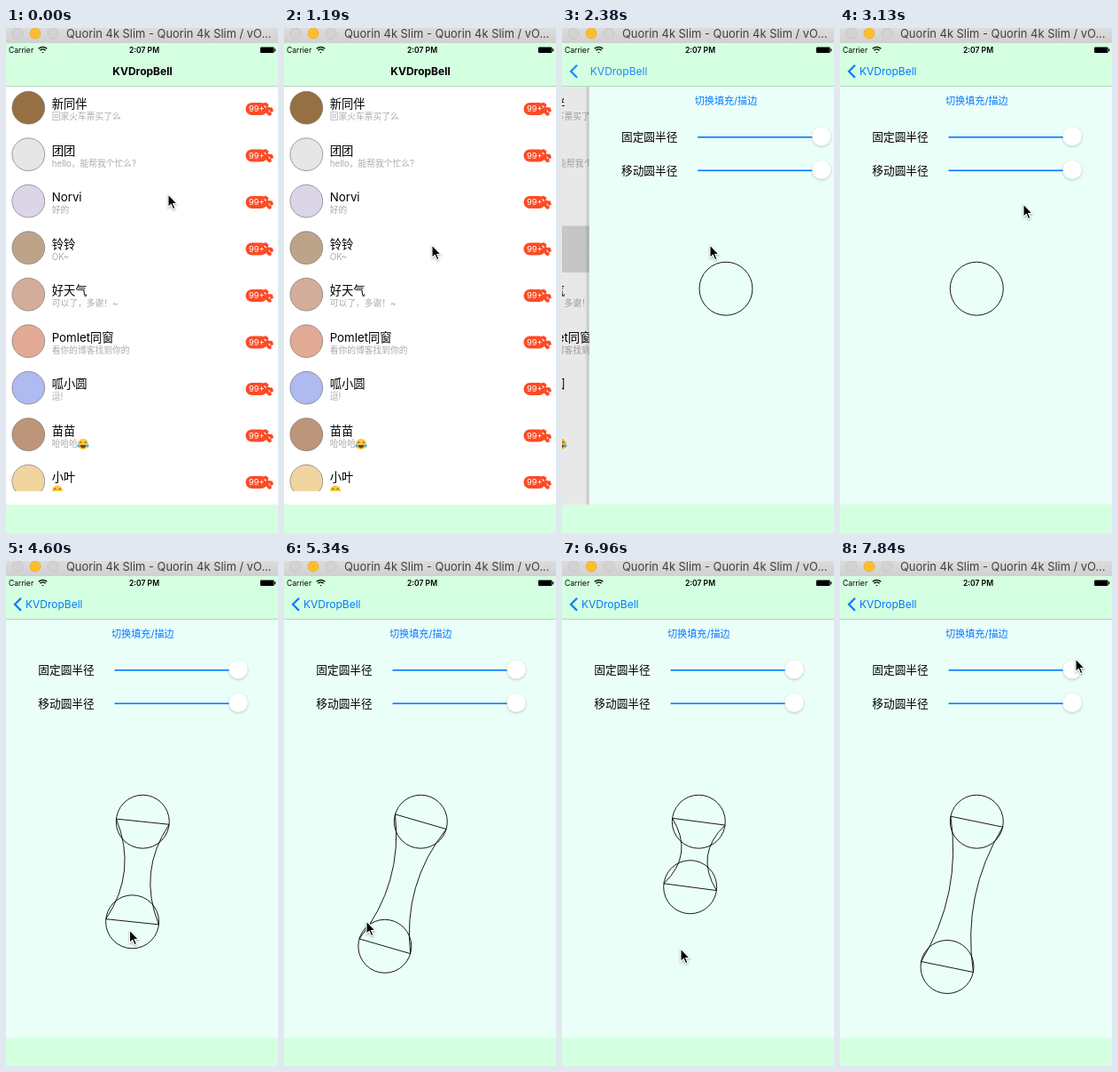
Animation, 307 px wide and 568 px high, one loop 7990 ms. Source, as an HTML page:

```html
<!DOCTYPE html>
<html lang="zh-CN">
<head>
<meta charset="utf-8">
<title>Liquid drag</title>
<style>
html, body { margin: 0; width: 100%; height: 100%; overflow: hidden; background: #d4ffe0; }
svg { display: block; width: 307px; height: 568px; }
text { font-family: Inter, "Noto Sans CJK SC", "Noto Sans CJK", sans-serif; white-space: pre; }
.name { font-size: 13.3px; }
.note { font-size: 9.75px; fill: #aaa; }
.count { font-size: 9.3px; fill: #fff; }
.nav { font-size: 12px; }
.label { font-size: 12.7px; }
.blue { fill: #007aff; }
.mid { text-anchor: middle; }
.line { fill: none; stroke: #000; stroke-width: .9; }
.knob { fill: #fff; filter: drop-shadow(0 1.5px 1.5px rgba(0, 0, 0, .22)); }
#pointer { filter: drop-shadow(0 1px 1px rgba(0, 0, 0, .35)); }
</style>
</head>
<body>
<svg viewBox="0 0 307 568">
  <defs>
    <linearGradient id="chrome" x2="0" y2="1">
      <stop stop-color="#dcdcdc"/><stop offset="1" stop-color="#d0d0d0"/>
    </linearGradient>
    <linearGradient id="edge">
      <stop stop-color="#000" stop-opacity="0"/><stop offset="1" stop-color="#000" stop-opacity=".18"/>
    </linearGradient>
    <clipPath id="stage"><rect y="66" width="307" height="470"/></clipPath>
    <clipPath id="table"><rect y="66" width="307" height="455"/></clipPath>
    <g id="badge">
      <rect x="270.5" y="19" width="24.5" height="14" rx="7" fill="#fb4b26"/>
      <path d="M290 20l3-1.500 3.500 2.500-1 3 5 .5 1.500 4-3 1.500 1 2.500-3 1.500-4-4z" fill="#fb4b26"/>
      <path d="M291.500 22.500l2 2M296.500 27.500l1.800 2.200" stroke="#fff" stroke-width="1.100"/>
      <text class="count" x="274" y="29.400">99+</text>
    </g>
    <g id="face">
      <circle r="6" fill="#fdc93a"/>
      <path d="M-4-1.500q1.300-1.800 2.600 0M1.400-1.500q1.300-1.800 2.600 0" fill="none" stroke="#6b4315"/>
      <path d="M-3.500 1h7q-.5 3.500-3.500 3.500T-3.500 1z" fill="#7a4218"/>
    </g>
    <g id="tears" fill="#4fb4ee">
      <circle cx="-5" cy="2" r="1.700"/><circle cx="5" cy="2" r="1.700"/>
    </g>
  </defs>

  <rect width="307" height="568" fill="#d4ffe0"/>

  <g clip-path="url(#stage)">
    <g id="list">
      <rect y="66" width="307" height="470" fill="#fff"/>
      <rect id="pressed" y="222.5" width="307" height="52.5" fill="#d9d9d9"/>
      <g id="rows" clip-path="url(#table)"></g>
    </g>
    <rect id="dim" y="66" width="307" height="470"/>
    <g id="detail">
      <rect x="-5" y="66" width="5" height="470" fill="url(#edge)"/>
      <rect y="66" width="307" height="470" fill="#ebfff9"/>
      <text class="blue mid" x="154.3" y="86.200" font-size="11.100">切换填充/描边</text>
      <g id="sliders"></g>
      <circle class="line" cx="154.300" cy="293.200" r="30"/>
      <g id="blob">
        <circle class="line" id="ball" r="30"/>
        <path class="line" id="bridge"/>
      </g>
    </g>
  </g>

  <rect y="65" width="307" height="1" fill="#b4d8bf"/>
  <text class="nav mid" id="title" x="154" y="52.700" font-weight="700">KVDropBell</text>
  <g id="back">
    <path d="M17 41.800l-7 7 7 7" fill="none" stroke="#007aff" stroke-width="2.200"/>
    <text class="nav blue" id="backLabel" x="22" y="53">KVDropBell</text>
  </g>

  <text x="3" y="28" font-size="8.600">Carrier</text>
  <g fill="none" stroke="#000" stroke-width="1.300">
    <path d="M36.700 23.300q4.800-4 9.600 0M38.400 25.200q3.100-2.500 6.200 0"/>
    <path d="M40.200 26.900l1.300 1.300 1.300-1.300z" fill="#000" stroke="none"/>
  </g>
  <text class="mid" x="156" y="28" font-size="8.600" font-weight="600">2:07 PM</text>
  <rect x="287" y="21.500" width="15.500" height="6.500" rx="1"/>
  <rect x="303" y="23.300" width="1.200" height="3"/>

  <rect width="307" height="17" fill="url(#chrome)"/>
  <g fill="#d3d3d3" stroke="#c0c0c0" stroke-width=".8">
    <circle cx="13" cy="6" r="6"/>
    <circle cx="33" cy="6" r="6" fill="#fdbd2f" stroke="#e9ab2c"/>
    <circle cx="53" cy="6" r="6"/>
  </g>
  <text x="68" y="11" font-size="12.900" fill="#404040">Quorin 4k Slim - Quorin 4k Slim / vO...</text>

  <g id="pointer">
    <path d="M0 0v14.500l3.300-3 2.300 5.200 2.400-1-2.300-5.200h4.500z" stroke="#fff" stroke-width="1.100"/>
  </g>
</svg>
<script>
const LOOP = 7990, STEP = 147.2;
const FIXED = { x: 154.3, y: 293.2 }, R = 30;
const el = id => document.getElementById(id);
const set = (id, attrs) => {
  for (const key in attrs) el(id).setAttribute(key, attrs[key]);
};
const move = (id, x, y = 0) => set(id, { transform: `translate(${x} ${y})` });
const clamp = (v, lo, hi) => Math.min(hi, Math.max(lo, v));
const use = (id, x) => `<use href="#${id}" x="${x}" y="35.5"/>`;

const contacts = [
  ['新同伴', '回家火车票买了么', '#966f43'],
  ['团团', 'hello，能帮我个忙么?', '#e6e6e6'],
  ['Norvi', '好的', '#dcd5e8'],
  ['铃铃', 'OK~', '#bda489'],
  ['好天气', '可以了，多谢！~', '#d3ad9a'],
  ['Pomlet同窗', '看你的博客找到你的', '#e2aa94'],
  ['呱小圆', '逗!', '#aebaf0'],
  ['苗苗', '哈哈哈', '#bd9579', use('face', 87) + use('tears', 87)],
  ['小叶', '', '#f0d5a0', use('face', 58)]
];
el('rows').innerHTML = contacts.map(([name, note, color, emoji = ''], i) => `
  <g transform="translate(0 ${65 + 52.5 * i})">
    <circle cx="25.300" cy="24.700" r="18.400" fill="${color}" stroke="#777" stroke-width=".7"/>
    <text class="name" x="51.700" y="25.200">${name}</text>
    <text class="note" x="51.700" y="38.300">${note}</text>
    ${emoji}
    <use href="#badge"/>
  </g>`).join('');

el('sliders').innerHTML = [['固定圆半径', 122.3], ['移动圆半径', 159.8]].map(([label, y]) => `
  <text class="label" x="36.300" y="${y + 4.7}">${label}</text>
  <rect class="blue" x="122.500" y="${y - 0.3}" width="140" height="1.600"/>
  <circle class="knob" cx="262.200" cy="${y - 0.3}" r="10.600"/>`).join('');

// Knots are [step, x, y].
const toRow = [[-1, 183, 187], [1, 164, 212], [2, 160, 228], [4, 167, 244]];
const toBall = [[-1, 167, 244], [0, 207, 198], [1, 217, 212], [4, 157, 294]];
const drag = [
  [-1, 154.3, 293.2], [1, 161, 325], [4, 142.6, 405.8], [5, 139.5, 415], [7, 127, 446],
  [9, 113.8, 433.3], [10, 93, 405], [13, 70, 300], [15, 75.6, 218.4], [16, 99, 203],
  [17, 125, 196], [18, 145, 225], [19, 152, 290], [21, 134, 436], [22, 121, 456.5]
];
const leave = [[23, 151, 235], [24, 194, 180], [25, 245, 126], [26, 266, 110]];

// Smooth curve through the knots, held at both ends.
function along(knots, k) {
  const last = knots.length - 1;
  k = clamp(k, knots[0][0], knots[last][0]);
  const i = clamp(knots.findIndex(p => p[0] >= k) - 1, 0, last - 1);
  const a = knots[i], b = knots[i + 1], span = b[0] - a[0], u = (k - a[0]) / span;
  const slope = (j, c) => {
    const p = knots[Math.max(0, j - 1)], q = knots[Math.min(last, j + 1)];
    return (q[c] - p[c]) / (q[0] - p[0]);
  };
  const at = c => a[c] * (1 + 2 * u) * (1 - u) ** 2 + b[c] * u * u * (3 - 2 * u)
    + span * (slope(i, c) * u * (1 - u) ** 2 - slope(i + 1, c) * u * u * (1 - u));
  return { x: at(1), y: at(2) };
}

const stepAt = (t, start, count) => clamp(Math.floor((t - start + 10) / STEP), -1, count - 1);

function pointerAt(t, k) {
  if (k >= 23) return along(leave, k);
  if (k >= 0) return along(drag, k + 1); // the ball trails the pointer by one step
  const c = stepAt(t, 3130, 5);
  return c >= 0 ? along(toBall, c) : along(toRow, stepAt(t, 600, 5));
}

function drawBlob({ x, y }) {
  const dx = x - FIXED.x, dy = y - FIXED.y, d = Math.hypot(dx, dy);
  set('blob', { visibility: d < 1 ? 'hidden' : 'visible' });
  if (d < 1) return;
  const nx = -dy / d * R, ny = dx / d * R;
  const end = (p, side) => `${p.x + side * nx} ${p.y + side * ny}`;
  const ball = { x, y }, waist = `${FIXED.x + dx / 2} ${FIXED.y + dy / 2}`;
  set('ball', { cx: x, cy: y });
  set('bridge', {
    d: `M${end(FIXED, 1)}Q${waist} ${end(ball, 1)}L${end(ball, -1)}Q${waist} ${end(FIXED, -1)}Z`
  });
}

function drawPush(k) {
  const p = k < 0 ? 0 : [.098, .62, .9, .98, 1][k];
  move('list', -98 * p);
  move('detail', 307 * (1 - p) + (p ? 0 : 10));
  set('dim', { opacity: .1 * p });
  set('pressed', { opacity: k < 0 ? 0 : 1 });
  move('title', -72 * p);
  set('title', { opacity: clamp(1 - 2.4 * p, 0, 1) });
  set('back', { opacity: clamp((p - .2) / .8, 0, 1) });
  move('backLabel', 98 * (1 - p));
}

function render() {
  const t = performance.now() % LOOP;
  const k = stepAt(t, 4010, 27), pointer = pointerAt(t, k);
  drawPush(stepAt(t, 2090, 5));
  drawBlob(along(drag, k));
  move('pointer', pointer.x, pointer.y);
  requestAnimationFrame(render);
}
render();
</script>
</body>
</html>
```
